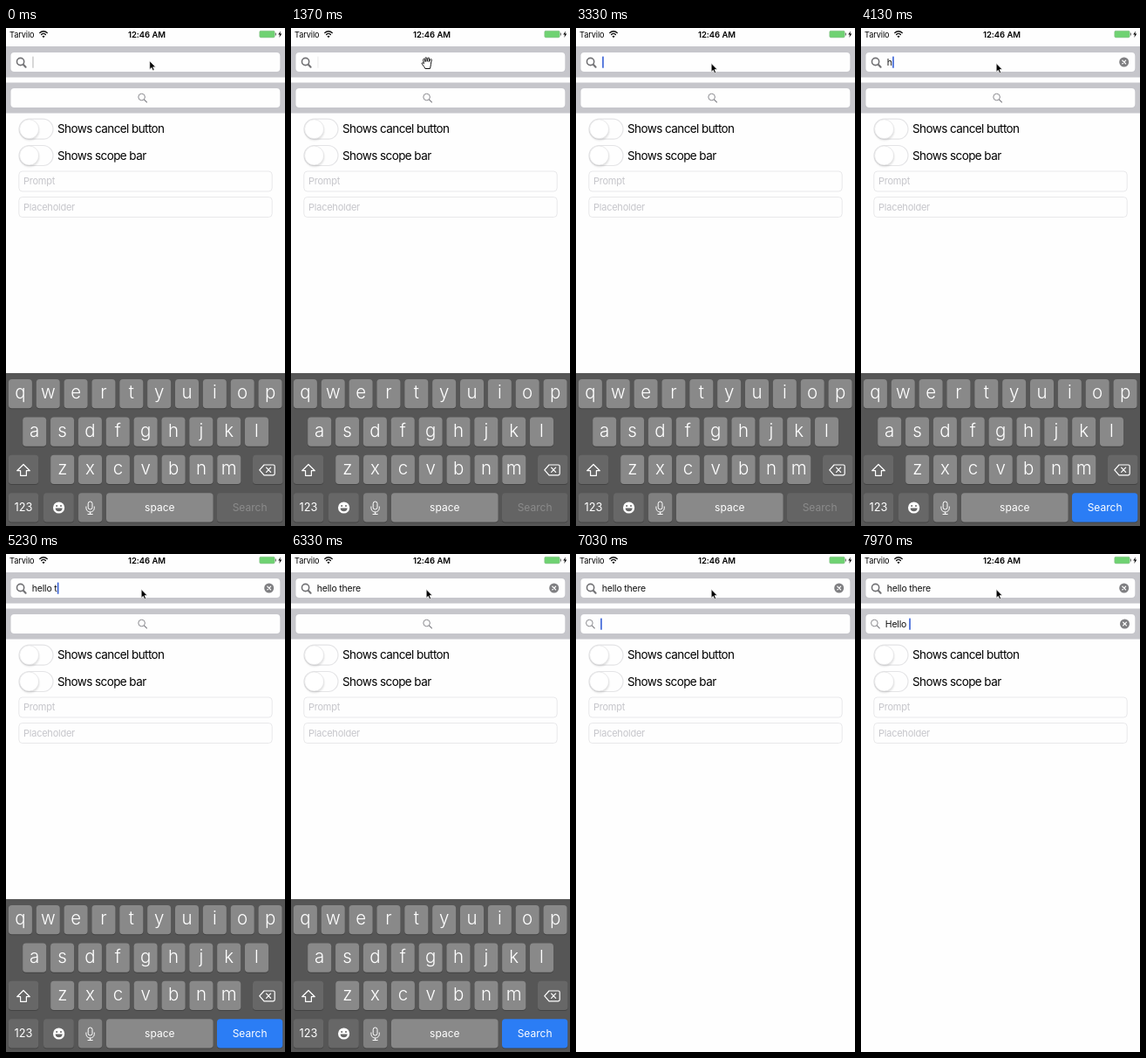
Animation of 320 by 570 pixels, one loop 8000 ms. Source, as an HTML page:

```html
<!DOCTYPE html>
<html lang="en">
<head>
<meta charset="utf-8">
<title>Search bars</title>
<style>
  html, body { margin: 0; width: 100%; height: 100%; overflow: hidden; background: #fefefe; }
  svg { display: block; width: 100%; height: 100%; }
  text { font-family: Inter, Roboto, "Liberation Sans", sans-serif; }
  .label { font-size: 13.5px; letter-spacing: -.58px; }
  .hint { font-size: 11px; letter-spacing: -.24px; fill: #c6c6cb; }
  .input { font-size: 10.5px; letter-spacing: -.2px; fill: #111; }
  .mid { text-anchor: middle; }
</style>
</head>
<body>
<svg id="stage" viewBox="0 0 320 570"></svg>
<script>
const LOOP = 8000;
const stage = document.getElementById('stage');
const $ = id => document.getElementById(id);

const rect = (x, y, w, h, r, fill, extra = '') =>
  `<rect x="${x}" y="${y}" width="${w}" height="${h}" rx="${r}" fill="${fill}" ${extra}/>`;
const line = (d, color, width) =>
  `<path d="${d}" fill="none" stroke="${color}" stroke-width="${width}" stroke-linecap="round" stroke-linejoin="round"/>`;
const label = (x, y, cls, str, extra = '') =>
  `<text x="${x}" y="${y}" class="${cls}" ${extra}>${str}</text>`;

function statusBar() {
  return label(4, 10.6, '', 'Tarvilo', 'font-size="9.2" letter-spacing="-.1"') +
    line('M38.8 5.4a6 6 0 0 1 8.4 0M40.6 7.5a3.5 3.5 0 0 1 4.8 0', '#111', 1.4) +
    '<path d="M43 11.2l-1.5-1.8a2.2 2.2 0 0 1 3 0z"/>' +
    label(161.5, 10.7, 'mid', '12:46 AM', 'font-size="9.5" font-weight="600" letter-spacing="-.05"') +
    rect(290.8, 3.3, 17.4, 7.6, 1.4, '#6fd272', 'stroke="#8fbf90" stroke-width=".6"') +
    rect(308.8, 5.6, 1.2, 3, .6, '#777') +
    '<path d="M315 3.4l-2.8 4.2h1.9l-.8 3.4 3-4.4h-2z"/>';
}

function searchBar(id, top, height, fieldTop, clearX, lens) {
  const mid = fieldTop + 11;
  return rect(0, top, 320, height, 0, '#c6c6cb') +
    rect(5.5, fieldTop, 308.8, 22, 4, '#fefefe') + lens +
    label(id === 'a' ? 29.8 : 27.8, mid + 3.9, 'input', '', `id="${id}Text"`) +
    rect(0, mid - 6.6, 1.7, 13.4, .5, '#4168d8', `id="${id}Caret"`) +
    `<g id="${id}Clear" transform="translate(${clearX} ${mid})"><circle r="5.5" fill="#7f7f82"/>` +
    line('M-1.9-1.9l3.8 3.8m0-3.8l-3.8 3.8', '#fff', 1.3) + '</g>';
}

function option(y, str) {
  return rect(15, y - 11.5, 39, 23, 11.5, '#fefefe', 'stroke="#e4e4e6" stroke-width="1.2"') +
    `<circle cx="27" cy="${y + 1.8}" r="11" fill="#000" opacity=".13" filter="url(#soft)"/>` +
    `<circle cx="26.6" cy="${y}" r="11" fill="#fff" stroke="#dcdcde" stroke-width=".6"/>` +
    label(59, y + 4.7, 'label', str);
}

const hintField = (y, str) =>
  rect(14.8, y, 290.4, 23, 4, '#fefefe', 'stroke="#e6e6e8" stroke-width=".9"') +
  label(20, y + 15.3, 'hint', str);

const dark = { bg: '#565656', key: '#898989', alt: '#676767', mic: '#808080', edge: '#434343',
  ink: '#fff', off: '#646464', offInk: '#8b8b8b', weight: 300, size: 20.5 };
const light = { bg: '#c9cbd1', key: '#fefefe', alt: '#abb1bc', mic: '#fefefe', edge: '#8e9197',
  ink: '#111', off: '#abb1bc', offInk: '#7d828b', weight: 400, size: 18.5, caps: true };

// Drawn from its own top edge, so it can slide as one piece.
function keyboard(c) {
  const key = (x, y, w, fill, id = '') =>
    rect(x, y + 1, w, 33.3, 3.8, c.edge) + rect(x, y, w, 33.3, 3.8, fill, id);
  const rows = ['qwertyuiop', 'asdfghjkl', 'zxcvbnm'];
  const starts = [16.4, 32.7, 64.7], tops = [7, 50.4, 93.8], last = 137.2;
  let out = rect(0, 0, 320, 176, 0, c.bg);
  rows.forEach((row, r) => [...row].forEach((ch, i) => {
    const x = starts[r] + 31.85 * i;
    out += key(x - 13.5, tops[r], 27, c.key) +
      label(x, tops[r] + (c.caps ? 23.2 : 22.3), 'mid', c.caps ? ch.toUpperCase() : ch,
        `font-size="${c.size}" font-weight="${c.weight}" fill="${c.ink}"`);
  }));
  const word = (x, size, str, extra = `fill="${c.ink}"`) =>
    label(x, last + 20.4, 'mid', str, `font-size="${size}" ${extra}`);
  out += key(2.8, tops[2], 34.5, c.alt) + key(283, tops[2], 34.5, c.alt) +
    line('M20 104.5l-7.3 7.2h3.9v5.6h6.8v-5.6h3.9z', c.ink, 1.2) +
    line('M296 105h10.5q1.7 0 1.7 1.7v8.4q0 1.7-1.7 1.7H296l-5.2-5.9z' +
      'M298.6 108.2l5 5.2m0-5.2l-5 5.2', c.ink, 1.2);
  out += key(2.8, last, 34.5, c.alt) + key(43, last, 34.8, c.alt) +
    key(83, last, 27.3, c.mic) + key(115, last, 122.6, c.key) +
    key(242, last, 75.3, c.off, c.caps ? '' : 'id="goKey"') +
    word(20, 12.8, '123') + word(176.3, 12, 'space') +
    word(279.6, 12, 'Search', c.caps ? `fill="${c.offInk}"` : 'id="goText"');
  out += `<circle cx="60.6" cy="154" r="6.6" fill="${c.ink}"/>` +
    `<circle cx="58.2" cy="152" r="1" fill="${c.alt}"/><circle cx="63" cy="152" r="1" fill="${c.alt}"/>` +
    `<path d="M56.6 154.6h8a4 3.7 0 0 1-8 0z" fill="${c.alt}"/>`;
  out += rect(94.2, 147, 4.8, 9, 2.4, 'none', `stroke="${c.ink}" stroke-width="1"`) +
    line('M91.9 153v1.4a4.7 4.7 0 0 0 9.4 0V153M96.6 159v2.4M94 161.5h5.2', c.ink, 1);
  return out;
}

const bigLens = line('M20 42l2.6 2.7', '#737376', 2.1) +
  '<circle cx="16.6" cy="38.5" r="4.1" fill="none" stroke="#737376" stroke-width="1.6"/>';
const thinLens = '<g id="lens"><circle cx="155.6" cy="79" r="3.8" fill="none" stroke="#8b8b90"/>' +
  '<g id="handle">' + line('M158.5 82l3 3', '#8b8b90', 1.1) + '</g></g>';

stage.innerHTML =
  '<defs><filter id="soft" x="-30%" y="-30%" width="160%" height="160%">' +
  '<feGaussianBlur stdDeviation="1.3"/></filter></defs>' +
  rect(0, 0, 320, 570, 0, '#fefefe') + statusBar() +
  searchBar('a', 21, 35.5, 28, 301.7, bigLens) +
  searchBar('b', 62.5, 35, 69, 302.5, thinLens) +
  option(115.7, 'Shows cancel button') + option(146, 'Shows scope bar') +
  hintField(164, 'Prompt') + hintField(193.5, 'Placeholder') +
  `<g id="darkKeys" transform="translate(0 395)">${keyboard(dark)}</g>` +
  `<g id="lightKeys">${keyboard(light)}</g>` +
  '<path id="arrow" d="M0 0V9.6L2.2 7.6L3.7 11L5.3 10.3L3.8 6.9H6.8Z" fill="#000" stroke="#fff" stroke-width=".6"/>' +
  '<path id="hand" transform="translate(149.4 33)" fill="#fff" stroke="#111" stroke-width="1" stroke-linejoin="round" ' +
  'd="M4.5 13.5C3.5 11 1 9 .7 7.5C.8 6.5 2 6.6 3 7.8L2.2 3.4C2 2.2 3.6 2 4 3L4.7 5.6L4.6 1.6' +
  'C4.6 .4 6.2 .4 6.4 1.5L6.8 5.3L7.6 1.4C7.9 .5 9.3 .8 9.2 1.9L8.8 5.6L10.4 3' +
  'C11 2.1 12.2 2.7 11.9 3.7C11 6.5 11.2 10 10 13.5Z"/>';

const clamp = u => Math.max(0, Math.min(1, u));
const easeOut = (u, power) => 1 - (1 - clamp(u)) ** power;

// Linear interpolation over [time, value] pairs.
function along(keys, t) {
  let i = 0;
  while (i < keys.length - 1 && keys[i + 1][0] <= t) i++;
  const [t0, v0] = keys[i], [t1, v1] = keys[i + 1] || keys[i];
  return t1 > t0 ? v0 + (v1 - v0) * clamp((t - t0) / (t1 - t0)) : v0;
}

const first = { text: 'hello there', times: [3960, 4170, 4370, 4560, 4870, 5020, 5180, 5340, 5500, 5830, 5990] };
const second = { text: 'Hello ', times: [7100, 7300, 7430, 7560, 7830, 7920] };
const blinkA = [[0, .38], [450, 1], [830, 1], [1230, .12], [1370, .1], [1470, 0], [1670, 0], [1800, 1],
  [2070, 1], [2530, 0], [2830, 0], [3170, 1], [3400, 1], [3800, 0], [3950, 0], [3960, 1], [6080, 1], [6300, 0]];
const blinkB = [[6470, 0], [6570, .65], [6670, 1]];
const SWITCH = 6470;

const show = (id, on) => $(id).setAttribute('visibility', on ? 'visible' : 'hidden');

function typeInto(id, typing, alpha, t) {
  const count = typing.times.filter(s => s <= t).length;
  const el = $(id + 'Text'), caret = $(id + 'Caret');
  const str = typing.text.slice(0, count).replace(/ /g, '\u00a0');
  if (el.textContent !== str) el.textContent = str;
  const width = count ? el.getComputedTextLength() : 0;
  caret.setAttribute('x', +el.getAttribute('x') + width + .3);
  caret.setAttribute('opacity', alpha);
  caret.setAttribute('fill', alpha < .4 ? '#888' : '#4168d8');
  show(id + 'Clear', count > 0);
  return count;
}

function draw(t) {
  const typed = typeInto('a', first, along(blinkA, t), t);
  typeInto('b', second, along(blinkB, t), t);

  $('goKey').setAttribute('fill', typed ? '#2b7df5' : dark.off);
  $('goText').setAttribute('fill', typed ? '#fff' : dark.offInk);

  const switched = t >= SWITCH, u = switched ? (t - SWITCH + 30) / 245 : 0;
  show('darkKeys', !switched);
  show('lightKeys', switched && u < 1);
  $('lightKeys').setAttribute('transform', `translate(0 ${395 + 175 * easeOut(u, 3)})`);
  $('lens').setAttribute('transform', `translate(${-140.2 * easeOut(u, 3.7)} 0)`);
  $('handle').setAttribute('opacity', u > 0 && u < .8 ? .2 : 1);

  const grab = t >= 1210 && t < 1670;
  const move = clamp((t - 830) / 380), glide = move * move * (3 - 2 * move);
  show('hand', grab);
  show('arrow', !grab);
  $('arrow').setAttribute('transform', `translate(${164.8 - 9.6 * glide} ${37.8 + 2.8 * glide})`);
}

const begin = performance.now();
function tick() {
  draw((performance.now() - begin) % LOOP);
  requestAnimationFrame(tick);
}
tick();
</script>
</body>
</html>
```
